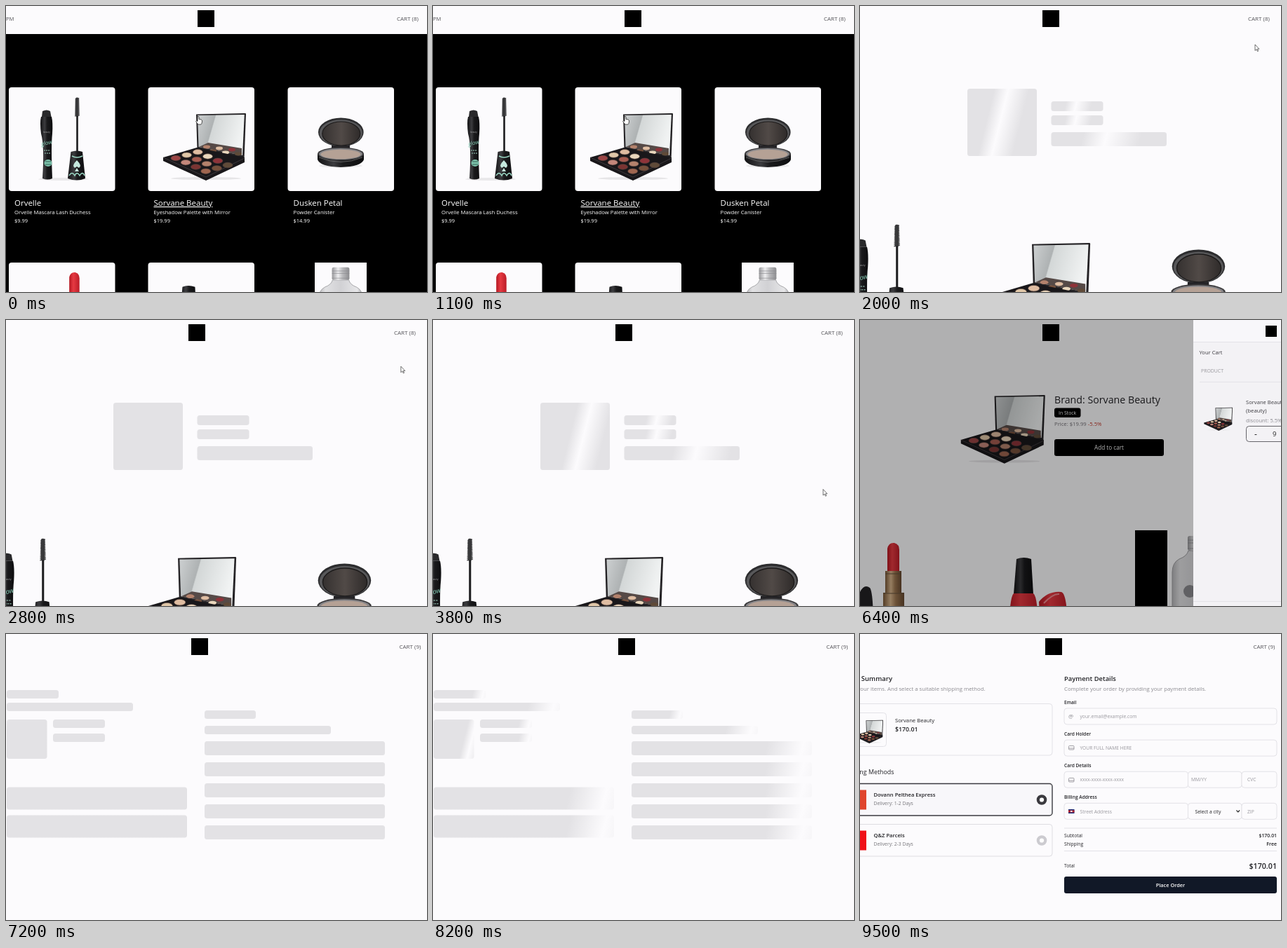
An HTML page that plays this animation: 600 px wide and 408 px high, repeating every 9600 ms.

```html
<!DOCTYPE html>
<html lang="en">
<head>
<meta charset="utf-8">
<title>Shop checkout</title>
<style>
html, body { margin: 0; width: 100%; height: 100%; overflow: hidden; background: #fcfbfd; }
svg { display: block; width: 100vw; height: 100vh; font-family: "Open Sans", "Noto Sans", sans-serif; }
</style>
</head>
<body>
<svg id="stage" viewBox="0 0 600 408" preserveAspectRatio="xMidYMid slice"></svg>
<script>
const LOOP = 9600, STEP = 100;
const PAGE = '#fcfbfd', GREY = '#e3e2e5', INK = '#222226', MUTED = '#8b8a90';

// Markup helpers
const rect = (x, y, w, h, fill, r = 0, more = '') =>
  `<rect x="${x}" y="${y}" width="${w}" height="${h}" rx="${r}" fill="${fill}" ${more}/>`;
const box = (x, y, w, h, stroke = '#e3e2e7', fill = PAGE, sw = 1) =>
  rect(x, y, w, h, fill, 4, `stroke="${stroke}" stroke-width="${sw}"`);
const path = (d, fill, more = '') => `<path d="${d}" fill="${fill}" ${more}/>`;
const oval = (x, y, rx, ry, fill, more = '') =>
  `<ellipse cx="${x}" cy="${y}" rx="${rx}" ry="${ry}" fill="${fill}" ${more}/>`;
const text = (x, y, size, str, fill = INK, more = '') =>
  `<text x="${x}" y="${y}" font-size="${size}" fill="${fill}" ${more}>${str}</text>`;
const line = (x1, y, x2, stroke = '#e3e2e7') =>
  `<path d="M${x1} ${y}H${x2}" stroke="${stroke}"/>`;
const put = (id, x, y, s = 1) => `<use href="#${id}" transform="translate(${x} ${y}) scale(${s})"/>`;
const group = (id, body, more = '') => `<g id="${id}" ${more}>${body}</g>`;
const grad = (id, stops, dir = 'x2="1" y2="0"') => `<linearGradient id="${id}" ${dir}>` +
  stops.map(([o, c]) => `<stop offset="${o}" stop-color="${c}"/>`).join('') + '</linearGradient>';
const BOLD = 'font-weight="600"', END = 'text-anchor="end"', MID = 'text-anchor="middle"';

// Products
function mascara() {
  let bristles = '';
  for (let y = 132; y < 157; y += 2) bristles += `M${98.6 - (y - 131) * .03} ${y + 1}L${104.2 + (y - 131) * .03} ${y - .4}`;
  return oval(82, 247, 36, 2, '#e9e8ea') +
    path('M52 150Q58 147 63 150L64.5 158H51Z', '#29292b') +
    path('M50 158H65Q67 166 66 182Q64 200 66 246Q59 249 52 246Q55 200 50 182Q48 166 50 158Z', 'url(#black)') +
    `<g fill="#86cdb6" text-anchor="middle" font-style="italic">
      <text font-size="8" transform="translate(58.5 198) rotate(-14)">glow</text></g>` +
    text(58, 181, 3, 'beauty', '#aaa', MID) +
    path('M54 206h9M55 210h9', 'none', 'stroke="#78998f" stroke-width="1.4" stroke-dasharray="2 1"') +
    oval(60, 224, 5.5, 5, '#7cc3ac') + path('M56 222h8M56 226h8', 'none', 'stroke="#335e53"') +
    rect(99, 130.5, 4.6, 27.5, '#39393b', 2) +
    path(bristles, 'none', 'stroke="#39393b" stroke-width="1.2"') +
    rect(100.2, 157, 2.6, 52, '#1c1c1e') +
    path('M92.5 208Q101 205 109 208L113 246Q101 251 88 246Z', 'url(#black)') +
    path('M94 214q7 4 15 0M90 242q4 -7 8 0q3 -7 7 0q4 -7 7 0', 'none', 'stroke="#9ad6c3" stroke-width="1.5"') +
    path('M101 220q8 8 3 11l-3 -2l-3 2q-5 -3 3 -11ZM98 236h6l-3 -5Z', '#c6eadf');
}

function palette() {
  const L = [227, 216], T = [274, 203], F = [284, 241];
  const shades = ['#9a4444', '#c4877b', '#7b3432', '#a06650', '#e0c7a8', '#a65b50', '#b4826c', '#76503b',
    '#dfbda2', '#ead7bd', '#8e3339', '#5f4a38'];
  let pans = '', glints = '';
  shades.forEach((c, i) => {
    const u = (i % 4 + .5) / 4, v = (Math.floor(i / 4) + .5) / 3;
    const x = L[0] + u * (F[0] - L[0]) + v * (T[0] - L[0]);
    const y = L[1] + u * (F[1] - L[1]) + v * (T[1] - L[1]);
    pans += oval(x.toFixed(1), y.toFixed(1), 7, 3.7, c, 'stroke="#594540" stroke-width=".6"');
    if (i > 5) glints += oval(286 + (i - 6) * 9, 201 + (i % 2) * 5 + (i - 6), 5, 2.4, c);
  });
  return oval(285, 246, 50, 2, '#e6e5e7') +
    path('M271 154.5L341 153Q342 153 342 154L339.5 219L272.5 205Z', '#242225') +
    path('M273 156L339.8 155L337 213L274.5 201Z', 'url(#mirror)') +
    path('M275 201L288 195L336 203V213Z', '#564a47') + glints +
    path('M224 216L272 202L340 216V223L285 249L224 221Z', '#19171a') +
    path('M224 216L285 244L340 217', 'none', 'stroke="#454045" stroke-width=".8"') + pans;
}

const compact = () =>
  oval(477, 228, 31, 2.5, '#ebeaec') +
  oval(477.3, 180, 32.3, 20.6, '#2d2d2f') + oval(477.3, 181, 30.5, 18.8, '#58585a') +
  oval(477.8, 182, 27, 17, 'url(#lid)', 'stroke="#1c1a1a" stroke-width="1.2"') +
  rect(464, 199, 26, 6, '#242326') +
  path('M444 211V219Q447 229 477 230Q507 229 510 219V211Z', 'url(#black)') +
  oval(477, 211, 33, 9.5, '#39383a') + oval(477, 211, 31, 8, '#858487') + oval(477, 211.5, 28.5, 6.8, '#b5a195') +
  path('M446 216Q477 229 508 216', 'none', 'stroke="#777" stroke-width=".7"');

const lipstick = () =>
  path('M0 388Q6 376 14 382Q19 388 19 440H-12Z', '#222124') +
  path('M39 360V326Q41 317 49 318Q56 320 56 328V360Z', 'url(#red)') +
  rect(36, 358, 23, 32, 'url(#gold)') + rect(33, 389, 30, 60, 'url(#gold)') +
  path('M36 362h23M33 390h30', 'none', 'stroke="#604c38"');

const polish = () =>
  path('M223 341Q233 337 244 341L247 391H219Z', 'url(#black)') +
  path('M219 390H247Q254 395 254 450H212Q213 395 219 390Z', 'url(#red)') +
  path('M255 402Q268 386 287 388Q296 391 296 450H258Z', 'url(#red)') +
  path('M262 404Q275 390 284 391', 'none', 'stroke="#ef8b90" stroke-width="2"');

const bottle = () => rect(438, 300, 87, 180, PAGE) +
  path('M468 329Q466 337 455 341Q445 346 445 360V480H518V360Q518 346 508 341Q497 337 495 329Z',
    'url(#glass)', 'stroke="#9c9c9f"') +
  rect(467, 308, 29, 21, 'url(#silver)', 3) +
  path('M467 314h29M467 318h29M467 326h29', 'none', 'stroke="#8c8c90" stroke-width=".8"') +
  oval(470, 387, 9, 9, '#8a8a8d');

const defs = '<defs>' +
  grad('black', [[0, '#111113'], [.35, '#3c3c3f'], [.55, '#1a1a1c'], [1, '#0d0d0f']]) +
  grad('red', [[0, '#b51722'], [.4, '#e63a42'], [1, '#bb1c27']]) +
  grad('gold', [[0, '#775636'], [.35, '#d7b58c'], [.6, '#9b7650'], [1, '#65482f']]) +
  grad('glass', [[0, '#b5b5b8'], [.15, '#e1e1e3'], [.5, '#d1d1d4'], [.88, '#e6e6e8'], [1, '#a7a7aa']]) +
  grad('silver', [[0, '#98989b'], [.35, '#eeeef0'], [.6, '#bbbbbe'], [1, '#8d8d90']]) +
  grad('lid', [[0, '#353130'], [.5, '#514a47'], [1, '#2f2b2a']]) +
  grad('mirror', [[0, '#cdd0d1'], [.36, '#aeb2b3'], [.38, '#d3d7d7'], [1, '#f1f3f3']], 'x2="1" y2=".25"') +
  Object.entries({ mascara, palette, compact, lipstick, polish, bottle })
    .map(([id, draw]) => group(id, draw())).join('') + '</defs>';

// Header shared by the pages
const header = (logoX, cartX, count) =>
  rect(logoX - 12, 6, 24, 24, '#000') + text(cartX, 21, 8, `CART (${count})`, '#555459');

// Product grid
function gridPage() {
  const k = 1 / 1.17;
  const items = [
    [4, 'Orvelle', 'Orvelle Mascara Lash Duchess', '$9.99'],
    [202.5, 'Sorvane Beauty', 'Eyeshadow Palette with Mirror', '$19.99'],
    [401.5, 'Dusken Petal', 'Powder Canister', '$14.99']];
  return rect(0, 0, 600, 408, '#000') + rect(0, 0, 600, 40, PAGE) + header(285, 557, 8) +
    text(0, 21, 7.6, 'PM', '#555459') +
    items.map(([x, brand, name, price], i) =>
      rect(x, 116, 151.5, 148, PAGE, 4) +
      (i < 2 ? rect(x, 366, 151.5, 60, PAGE, 4) : '') +
      text(x + 8, 285, 11.5, brand, '#fff', i === 1 ? 'text-decoration="underline"' : '') +
      text(x + 8, 297, 7.7, name, '#fff') + text(x + 8, 309, 7.5, price, '#fff')).join('') +
    put('mascara', 0, 0) + put('palette', 0, 0) + put('compact', 0, 0) +
    put('lipstick', 97 - 47 * k, 380 - 318 * k, k) +
    put('polish', 260 - 233 * k, 399 - 339 * k, k) +
    `<svg x="440" y="366" width="74" height="42" viewBox="440 366 74 42">` +
    put('bottle', 477 - 481.5 * k, 372 - 307 * k, k) + '</svg>';
}

// Shimmering placeholders
const bones = [];
function bone(set, x, y, w, h) {
  const id = 'shine' + bones.length;
  bones.push({ set, id, x, y, w, h });
  return `<linearGradient id="${id}" gradientUnits="userSpaceOnUse">
    <stop offset="0" stop-color="${GREY}"/><stop offset=".4" stop-color="${PAGE}"/>
    <stop offset="1" stop-color="${GREY}"/></linearGradient>` + rect(x, y, w, h, `url(#${id})`, 3.5);
}

function shine(set, peak) {
  for (const b of bones) {
    if (b.set !== set) continue;
    const span = b.w * .5, x1 = b.x + b.w * peak - span * .4, y1 = b.y + b.h / 2;
    const attrs = { x1, y1, x2: x1 + span * .94, y2: y1 + span * .235 };
    for (const a in attrs) $(b.id).setAttribute(a, attrs[a].toFixed(2));
  }
}

// Product page with cart drawer
const productBones = () => [[153, 118, 99, 96], [272.5, 136, 74, 14], [272.5, 156, 74, 14], [272.5, 180, 164.5, 20]]
  .map(r => bone('product', ...r)).join('');

const productInfo = () =>
  put('palette', -84, -48.6, 1.017) +
  text(277, 119, 14.2, 'Brand: Sorvane Beauty') +
  rect(277, 125.5, 37.5, 13.5, '#000', 3) + text(283, 135, 6.9, 'In Stock', '#fff') +
  text(277, 151, 7.7, 'Price: $19.99 <tspan fill="#c0392b">-5.5%</tspan>', '#717075') +
  rect(277, 170, 156, 24, '#000', 3) + text(355, 185, 8.2, 'Add to cart', '#fff', MID);

const SHIFT = 640;
const related = () => put('mascara', -66, 159, 1.17) + put('palette', -72, 159, 1.17) + put('compact', -76, 161, 1.17) +
  `<g transform="translate(${SHIFT})">` + put('lipstick', 0, 0) + put('polish', 0, 0) +
  rect(392, 300, 46, 108, '#000') + put('bottle', 0, 0) + '</g>';

const drawer = () => rect(475, 0, 125, 408, '#f3f2f5') + rect(475, 0, 125, 31, '#f8f7fa') +
  rect(578, 8, 16, 16, '#000') + line(475, 31.5, 600) +
  text(483.5, 49, 7.6, 'Your Cart', '#3c3b40') + text(486, 75, 6.9, 'PRODUCT', '#99989d') + line(484, 88.5, 600) +
  put('palette', 413, 72, .345) +
  text(550, 120, 7.6, 'Sorvane Beauty', '#3c3b40') + text(550, 132, 7.8, '(beauty)', '#3c3b40') +
  text(550, 146, 7.6, 'discount: 5.5%', MUTED) +
  box(550.5, 151.5, 80, 22, '#66656a', '#f3f2f5') +
  text(562, 167, 12, '-', '#222') + text(588, 166, 9.5, '9', '#222') + line(475, 401.5, 600);

// Checkout
function checkoutBones() {
  const list = [[1, 80, 74, 12], [1, 98, 180, 12], [1, 122, 57.5, 56], [67, 122, 74, 12], [67, 142, 74, 12],
    [1, 218.5, 257, 32], [1, 258.5, 257, 32], [283, 109, 73, 12], [283, 131, 180, 12]];
  for (let i = 0; i < 5; i++) list.push([283, 153 + i * 30, 257, 20]);
  return list.map(r => bone('checkout', ...r)).join('');
}

const radio = (y, c) => `<circle cx="259" cy="${y}" r="5.2" fill="#fff" stroke="${c}" stroke-width="4.2"/>`;
const shipping = (y, name, days, icon, on) =>
  box(-40, y, 314, 45.5, on ? '#3b3b40' : '#dedde2', on ? '#f8f7fa' : PAGE, on ? 1.4 : 1) +
  rect(-20, y + 9, 29, 28, icon) +
  text(19.5, y + 18, 7.6, name, INK, BOLD) + text(19.5, y + 30, 6.8, days, '#77767b') +
  radio(y + 23, on ? '#3a393e' : '#cccbd0');
const hint = (x, y, str) => text(x, y, 6.7, str, '#99989e');
const cardIcon = y => rect(297.5, y - 2.5, 7.5, 5.5, 'none', 1, 'stroke="#8b8a90" stroke-width=".8"') +
  path(`M298 ${y + 1}h7`, 'none', 'stroke="#8b8a90" stroke-width=".8"');

const checkoutForm = () =>
  text(46, 67, 9.5, 'Order Summary', INK, `${BOLD} ${END}`) +
  text(178.5, 81, 7.75, 'Check your items. And select a suitable shipping method.', MUTED, END) +
  box(-40, 99.5, 314, 73.5) + box(-20, 112.5, 57.5, 48) + put('palette', -85, 70, .345) +
  text(50, 125.5, 7.7, 'Sorvane Beauty', INK, 'font-weight="500"') + text(50, 139, 8.8, '$170.01', INK, BOLD) +
  text(48.5, 199.5, 8.9, 'Shipping Methods', INK, `font-weight="500" ${END}`) +
  shipping(213.5, 'Dovann Pelthea Express', 'Delivery: 1-2 Days', '#e0452c', true) +
  shipping(271.5, 'Q&amp;Z Parcels', 'Delivery: 2-3 Days', '#f01018', false) +
  text(291, 67, 9.4, 'Payment Details', INK, BOLD) +
  text(291, 81, 7.75, 'Complete your order by providing your payment details.', MUTED) +
  ['Email', 'Card Holder', 'Card Details', 'Billing Address'].map((label, i) => {
    const y = 106 + i * 45.1, cut = i > 1;
    return text(291, y - 6.5, 6.6, label, INK, BOLD) + box(291, y, cut ? 176.5 : 303, 23) +
      (cut ? box(467.5, y, 76.5, 23) + box(544, y, 50, 23) : '');
  }).join('') +
  text(297, 120, 8, '@', MUTED) + cardIcon(162) + cardIcon(208) +
  rect(297, 250, 8.5, 6, '#1f2f78') + rect(297, 251.5, 8.5, 3, '#b82632') + rect(300, 252, 2.6, 2, '#eee') +
  hint(313.5, 120, 'your.email@example.com') + hint(313.5, 165, 'YOUR FULL NAME HERE') +
  hint(313.5, 210, 'xxxx-xxxx-xxxx-xxxx') + hint(472, 210, 'MM/YY') + hint(552, 210, 'CVC') +
  hint(313.5, 255.5, 'Street Address') + text(477.5, 255.5, 6.8, 'Select a city', INK) + hint(552, 255.5, 'ZIP') +
  path('M536.5 251.5l2.3 2.4l2.3 -2.4', 'none', 'stroke="#222" stroke-width="1.1"') +
  line(291, 277, 594) + line(291, 309.5, 594) +
  text(291, 290, 6.7, 'Subtotal', INK, 'font-weight="500"') + text(594, 290, 6.9, '$170.01', INK, `${BOLD} ${END}`) +
  text(291, 302, 6.7, 'Shipping', INK, 'font-weight="500"') + text(594, 302, 7, 'Free', INK, `${BOLD} ${END}`) +
  text(291, 332.5, 6.7, 'Total', INK, 'font-weight="500"') + text(594, 334.5, 10.7, '$170.01', INK, `${BOLD} ${END}`) +
  rect(291, 346, 303, 24, '#111827', 3) + text(442.5, 361, 7.4, 'Place Order', '#fff', `${BOLD} ${MID}`);

const cursor = group('cursor',
  group('arrow', path('M0 0V8.6L2 6.8L3.5 9.8L4.7 9.2L3.3 6.3H5.9Z', '#fff', 'stroke="#333" stroke-width=".7"')) +
  group('hand', path('M3 1Q4 -.5 5 1V4.5Q9.5 4.5 9.5 7Q9.5 11 7.8 12H3.8L.5 7.5Q1 6 3 7.5Z',
    '#fff', 'stroke="#222" stroke-width=".8"')));

const stage = document.getElementById('stage');
stage.innerHTML = defs + rect(0, 0, 600, 408, PAGE) +
  group('grid', gridPage()) +
  group('product', header(272, 553, 8) + group('productBones', productBones()) +
    group('productInfo', productInfo()) + group('related', related()) +
    group('shade', rect(0, 0, 600, 408, '#000')) + group('drawer', drawer())) +
  group('checkout', header(276, 560.5, 9) + group('checkoutBones', checkoutBones()) +
    group('form', checkoutForm())) + cursor;

const $ = id => document.getElementById(id);
const show = (id, on) => $(id).setAttribute('display', on ? 'inline' : 'none');
const move = (id, x, y = 0) => $(id).setAttribute('transform', `translate(${x.toFixed(2)} ${y.toFixed(2)})`);
const ease = (t, a, b) => {
  const p = Math.min(1, Math.max(0, (t - a) / (b - a)));
  return p * p * (3 - 2 * p);
};

// Pointer path: time, x, y
const trail = [[0, 270, 157], [1100, 270, 157], [2000, 563, 55], [2700, 563, 62], [3800, 556, 241.5],
  [4400, 544, 403], [4500, 543, 412]];
function pointer(t) {
  let i = 0;
  while (i < trail.length - 2 && t >= trail[i + 1][0]) i++;
  const [a, x, y] = trail[i], [b, x2, y2] = trail[i + 1], p = ease(t, a, b);
  return [x + (x2 - x) * p, y + (y2 - y) * p];
}

function update(t) {
  const opened = t < 1300, paying = t >= 7100, loaded = t >= 3900;
  show('grid', opened);
  show('product', !opened && !paying);
  show('checkout', paying);
  show('productBones', !loaded);
  show('productInfo', loaded);
  show('checkoutBones', t < 9200);
  show('form', t >= 9200);

  shine('product', ((97 + (t - 2000) * .1195 + 200) % 200 - 50) / 100);
  shine('checkout', Math.min(1.3, Math.max(-.35, -.22 + (t - 7500) / 600)));

  const slide = ease(t, 3900, 4300);
  move('related', -SHIFT * slide);
  move('drawer', 130 * (1 - slide));
  $('shade').setAttribute('opacity', .3 * slide);

  move('cursor', ...pointer(t));
  show('cursor', t < 4500);
  show('hand', opened);
  show('arrow', !opened);
}

const start = performance.now();
function frame() {
  const t = (performance.now() - start) % LOOP;
  update(Math.floor(t / STEP) * STEP);
  requestAnimationFrame(frame);
}
update(0);
requestAnimationFrame(frame);
</script>
</body>
</html>
```
